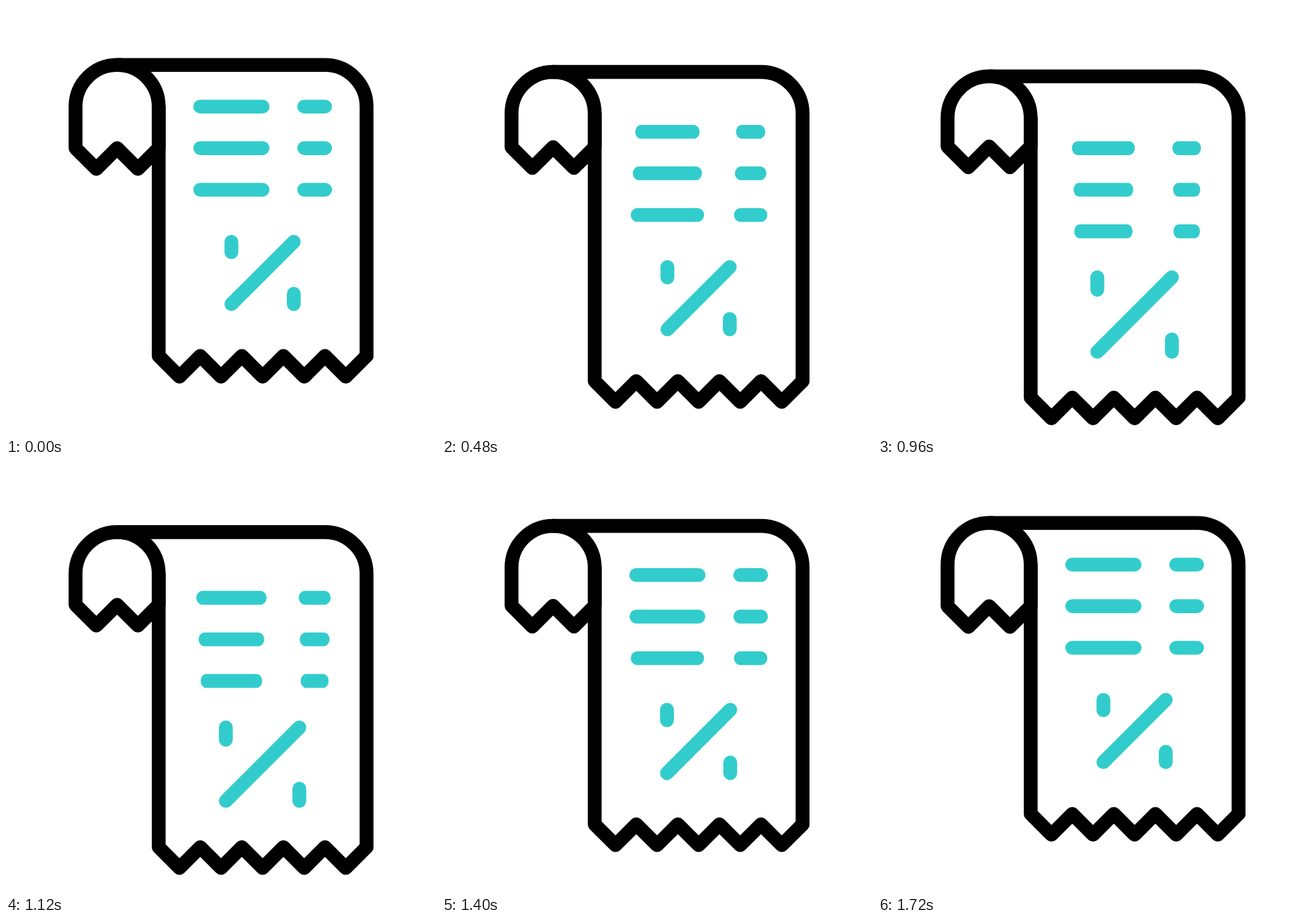
Animation, 640 px wide and 640 px high, one loop 1920 ms. Source, as an HTML page with a canvas:

```html
<!DOCTYPE html>
<html lang="en">
<head>
<meta charset="utf-8">
<title>Receipt</title>
<style>
  html, body { margin: 0; width: 100%; height: 100%; overflow: hidden; background: #fff; }
  canvas { display: block; width: 100vw; height: 100vh; }
</style>
</head>
<body>
<canvas id="stage" width="640" height="640"></canvas>
<script>
const ctx = document.getElementById('stage').getContext('2d');
const LOOP = 1920, STEP = 40;
const UNIT = 30.94, RADIUS = 2 * UNIT;
const LEFT = 103.5, FOLD = LEFT + 4 * UNIT, RIGHT = LEFT + 14 * UNIT;
const INK = '#000', TEAL = '#33cccc';

// Ease-in-out curve (0.42, 0, 0.58, 1), solved by bisection.
function ease(x) {
  if (x <= 0) return 0;
  if (x >= 1) return 1;
  let lo = 0, hi = 1;
  for (let i = 0; i < 24; i++) {
    const u = (lo + hi) / 2, v = 1 - u;
    if (3 * u * v * v * 0.42 + 3 * u * u * v * 0.58 + u * u * u < x) lo = u;
    else hi = u;
  }
  return lo * lo * (3 - 2 * lo);
}

// Rises from 0 to 1 and falls back to 0.
function pulse(t, start, rise, fall) {
  const peak = start + rise;
  return t < peak ? ease((t - start) / rise) : 1 - ease((t - peak) / fall);
}

function line(x1, y1, x2, y2) {
  ctx.beginPath();
  ctx.moveTo(x1, y1);
  ctx.lineTo(x2, y2);
  ctx.stroke();
}

function zigzag(x, y, teeth) {
  for (let i = 0; i <= teeth * 2; i++) ctx.lineTo(x + i * UNIT, y + (i % 2) * UNIT);
}

function drawPaper(drop) {
  const top = 87.8 + drop * 0.275, shoulder = top + RADIUS;
  ctx.strokeStyle = INK;

  ctx.beginPath();
  ctx.arc(LEFT + RADIUS, shoulder, RADIUS, 0, Math.PI, true);
  zigzag(LEFT, 211.6 - drop * 0.04, 2);
  ctx.closePath();
  ctx.stroke();

  ctx.beginPath();
  ctx.moveTo(LEFT + RADIUS, top);
  ctx.arc(RIGHT - RADIUS, shoulder, RADIUS, -Math.PI / 2, 0);
  ctx.lineTo(RIGHT, 520.8 + drop);
  ctx.stroke();

  ctx.beginPath();
  ctx.moveTo(FOLD, shoulder);
  zigzag(FOLD, 520.8 + drop, 5);
  ctx.stroke();
}

function drawDash(x, y, half, squeeze) {
  ctx.save();
  ctx.translate(x, y);
  ctx.scale(squeeze, 1);
  line(-half, 0, half, 0);
  ctx.restore();
}

function drawPercent(y, scale) {
  const x = 381.9, far = 46.4 * scale, near = 30.9 * scale;
  line(x - far, y + far, x + far, y - far);
  line(x - far, y - far, x - far, y - near);
  line(x + far, y + near, x + far, y + far);
}

function draw(t) {
  const drop = 65 * pulse(t, 66, 760, 868);
  ctx.fillStyle = '#fff';
  ctx.fillRect(0, 0, 640, 640);
  ctx.lineWidth = 20.6;
  ctx.lineCap = ctx.lineJoin = 'round';
  drawPaper(drop);

  ctx.strokeStyle = TEAL;
  for (let row = 0; row < 3; row++) {
    const squeeze = 1 - 0.235 * pulse(t, 110 + row * 100, 622, 645);
    const y = 149.7 + row * RADIUS + drop;
    drawDash(335.5, y, 46.4, squeeze);
    drawDash(459.4, y, 15.5, squeeze);
  }
  drawPercent(397.4 + drop, 1 + 0.2 * pulse(t, 525, 485, 485));
}

function tick() {
  const t = performance.now() % LOOP;
  draw(Math.floor(t / STEP) * STEP);
  requestAnimationFrame(tick);
}
tick();
</script>
</body>
</html>
```
